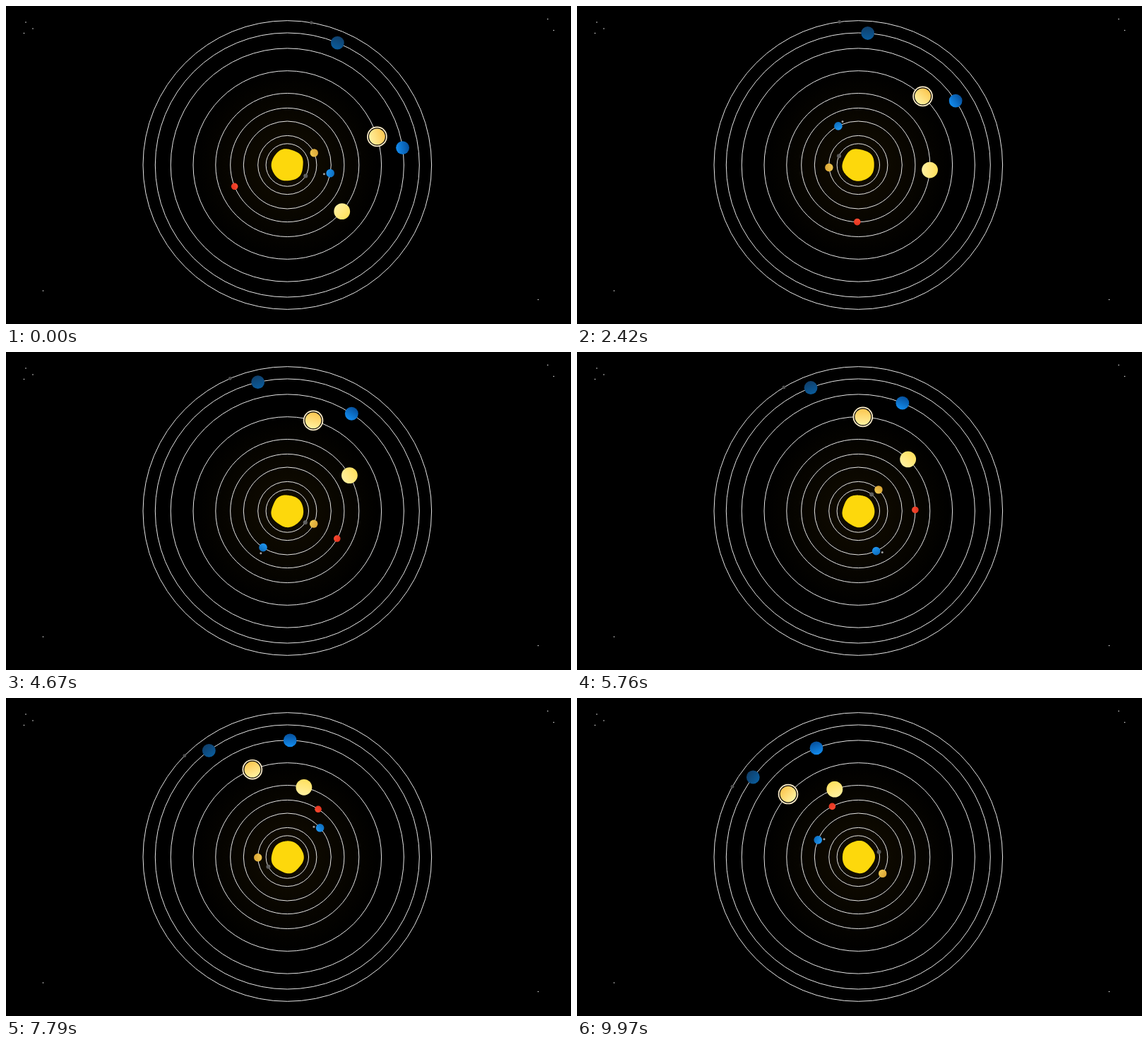
These frames come from a looping animation (800x450 px, 10 s). An HTML page with a canvas:

```html
<!DOCTYPE html>
<html lang="en">
<head>
<meta charset="utf-8">
<title>Orbits</title>
<style>
  html, body { margin: 0; width: 100%; height: 100%; overflow: hidden; background: #000; }
  canvas { display: block; width: 800px; height: 450px; }
</style>
</head>
<body>
<canvas id="stage" width="800" height="450"></canvas>
<script>
const ctx = document.getElementById('stage').getContext('2d');
const LOOP = 10000, CX = 398.3, CY = 225, TAU = Math.PI * 2;
const rad = deg => deg * Math.PI / 180;

// orbit radius, start angle, degrees per second, size, inner colour, outer colour
const planets = [
  [30.2, -30.7, 76.7, 3, '#6a6a6a', '#555555'],
  [41.6, 24.2, 66.35, 5.7, '#f0c850', '#dba535'],
  [62, -10.9, 52.95, 5.8, '#1f97f2', '#0d6dbd'],
  [80.6, 202.1, 27.6, 4.8, '#fb4a30', '#e23420'],
  [101.5, -40.3, 15, 11.4, '#fff0a0', '#ffe05e'],
  [133.3, 17.5, 12.1, 11.4, '#fff2a0', '#fcc650'],
  [165.1, 8.5, 10.286, 9.4, '#138df0', '#06509c'],
  [187, 67.65, 7.54, 9.4, '#0a5c9c', '#103f6a'],
  [204.3, 80.4, 7.06, 2.4, '#5a5a5a', '#4a4a4a']
];
const EARTH = 2, SATURN = 5;
const stars = [[28, 23], [38, 32], [25.5, 38.5], [767, 18.5], [775.5, 34.5], [52.5, 403], [753.5, 415.5]];

function disc(x, y, r, fill) {
  ctx.beginPath();
  ctx.arc(x, y, r, 0, TAU);
  ctx.fillStyle = fill;
  ctx.fill();
}

function ring(x, y, r, width, colour) {
  ctx.beginPath();
  ctx.arc(x, y, r, 0, TAU);
  ctx.lineWidth = width;
  ctx.strokeStyle = colour;
  ctx.stroke();
}

function backdrop() {
  ctx.fillStyle = '#000';
  ctx.fillRect(0, 0, 800, 450);
  const glow = ctx.createRadialGradient(CX, CY, 20, CX, CY, 135);
  glow.addColorStop(0, '#100b00');
  glow.addColorStop(1, '#000');
  disc(CX, CY, 135, glow);
  for (const [x, y] of stars) disc(x, y, 0.8, '#ddd');
}

// A soft blob whose lobes drift against each other
function sun(s) {
  ctx.beginPath();
  for (let i = 0; i < 120; i++) {
    const a = i / 120 * TAU;
    const r = 22.7 + 0.45 * Math.cos(5 * (a + rad(32 + 4 * s)))
                   + 0.35 * Math.cos(4 * (a + rad(35 - 3 * s)));
    ctx.lineTo(CX + 0.2 + r * Math.cos(a), CY + r * Math.sin(a));
  }
  ctx.closePath();
  ctx.fillStyle = '#fdd80c';
  ctx.fill();
}

function planet([orbit, start, speed, size, inner, outer], index, s) {
  const a = rad(start + speed * s);
  const ux = Math.cos(a), uy = -Math.sin(a);
  const x = CX + orbit * ux, y = CY + orbit * uy;
  if (index === SATURN) {
    disc(x, y, 14.3, '#fff0cc');
    disc(x, y, 12.6, '#000');
  }
  const shade = ctx.createLinearGradient(x - size * ux, y - size * uy, x + size * ux, y + size * uy);
  shade.addColorStop(0, inner);
  shade.addColorStop(1, outer);
  disc(x, y, size, shade);
  if (index === EARTH) {
    const m = rad(187 + 90.3 * s);
    disc(x + 8.8 * Math.cos(m), y - 8.8 * Math.sin(m), 1.5, '#a0a0a0');
  }
}

function draw(ms) {
  const s = ms / 1000;
  backdrop();
  for (const [orbit] of planets) ring(CX, CY, orbit, 1, '#e6e6e6');
  sun(s);
  planets.forEach((p, i) => planet(p, i, s));
}

const began = performance.now();
function tick() {
  draw((performance.now() - began) % LOOP);
  requestAnimationFrame(tick);
}
tick();
</script>
</body>
</html>
```
